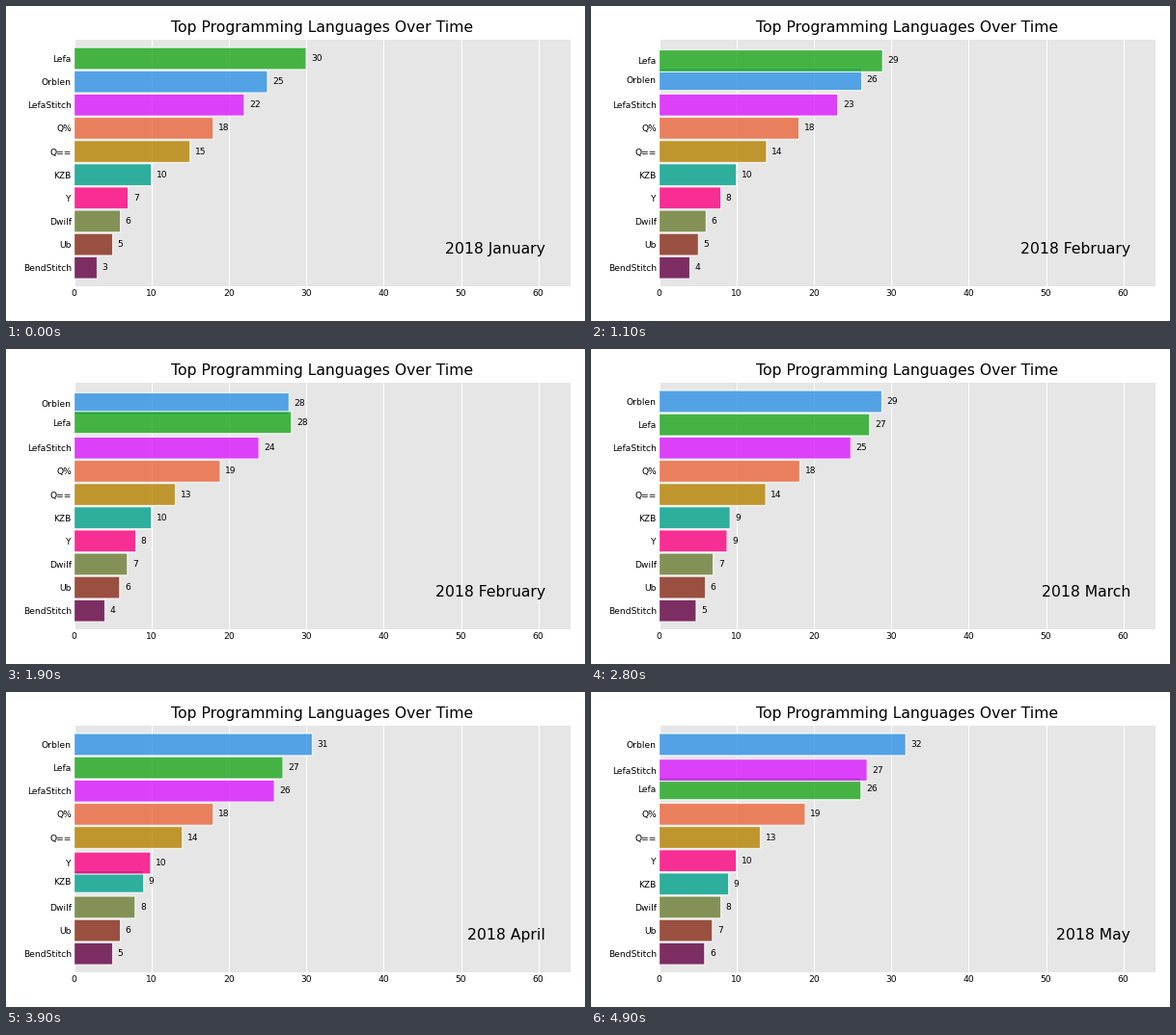
These frames come from a looping animation (600x327 px, 5 s). A matplotlib script:

```python
import numpy as np
import matplotlib.pyplot as plt
from matplotlib.animation import FuncAnimation

plt.rcParams["font.family"] = "DejaVu Sans"

W, H, DPI = 600, 327, 100
SCALE = 0.9375           # point sizes are given for a 93.75 dpi figure
STEPS, FRAMES, INTERVAL = 10, 50, 100
MONTHS = ["January", "February", "March", "April", "May"]

# name, colour, share at the start of each month (last one is the next month's goal)
SERIES = [
    ("Orblen", "#2E91E5", [25, 26, 28, 29, 31, 32]),
    ("Lefa", "#1CA71C", [30, 29, 28, 27, 27, 26]),
    ("LefaStitch", "#DA16FF", [22, 23, 24, 25, 26, 27]),
    ("Q==", "#B68100", [15, 14, 13, 14, 14, 13]),
    ("Q%", "#EB663B", [18, 18, 19, 18, 18, 19]),
    ("KZB", "#00A08B", [10, 10, 10, 9, 9, 9]),
    ("Y", "#FC0080", [7, 8, 8, 9, 10, 10]),
    ("Dwilf", "#6C7C32", [6, 6, 7, 7, 8, 8]),
    ("Ub", "#862A16", [5, 5, 6, 6, 6, 7]),
    ("BendStitch", "#620042", [3, 4, 4, 5, 5, 6]),
]
names, colors, shares = zip(*SERIES)
shares = np.array(shares, float)
count = len(names)

# Bar slot per month: the largest share sits in the top slot, ties keep series order
order = np.argsort(-shares, axis=0, kind="stable")
slots = count - np.argsort(order, axis=0).astype(float)


def at(table, frame):
    keys = np.arange(table.shape[1]) * STEPS
    return np.array([np.interp(frame, keys, row) for row in table])


LEFT, RIGHT, TOP, BOTTOM = 70.5, 585, 35.2, 291
PX_PER_UNIT = 8.02

fig = plt.figure(figsize=(W / DPI, H / DPI), dpi=DPI, facecolor="white")
ax = fig.add_axes([LEFT / W, 1 - BOTTOM / H, (RIGHT - LEFT) / W, (BOTTOM - TOP) / H],
                  facecolor="0.9")
x_max = (RIGHT - LEFT) / PX_PER_UNIT
ax.set_xlim(0, x_max)
ax.set_ylim(0.2, count + 0.8)
ax.set_xticks(range(0, 61, 10))
ax.set_axisbelow(True)
ax.grid(True, axis="x", color="white", lw=0.8 * SCALE)
ax.tick_params(length=0, labelsize=7 * SCALE, pad=2 * SCALE)
ax.spines[:].set_visible(False)
ax.set_title("Top Programming Languages Over Time", fontsize=12 * SCALE, pad=6 * SCALE)

bars = ax.barh(slots[:, 0], shares[:, 0], height=0.95, color=colors,
               ec="white", lw=SCALE, alpha=0.8)
for bar in bars:
    bar.set_snap(False)
labels = [ax.text(0, 0, "", fontsize=7 * SCALE, ha="left", va="center") for _ in names]
period = ax.text(0.95, 0.15, "", transform=ax.transAxes, fontsize=12 * SCALE,
                 ha="right", va="center")
ax.set_xlim(0, x_max)
ax.set_ylim(0.2, count + 0.8)


def update(frame):
    values, rows = at(shares, frame), at(slots, frame)
    for bar, label, value, row in zip(bars, labels, values, rows):
        bar.set_width(value)
        bar.set_y(row - bar.get_height() / 2)
        label.set_position((value + 0.01 * x_max, row))
        label.set_text(f"{value:.0f}")
    ax.set_yticks(rows, labels=names)
    period.set_text(f"2018 {MONTHS[frame // STEPS]}")
    return [*bars, *labels, period]


anim = FuncAnimation(fig, update, frames=FRAMES, interval=INTERVAL,
                     repeat=True, repeat_delay=0, blit=False)
plt.show()
```
